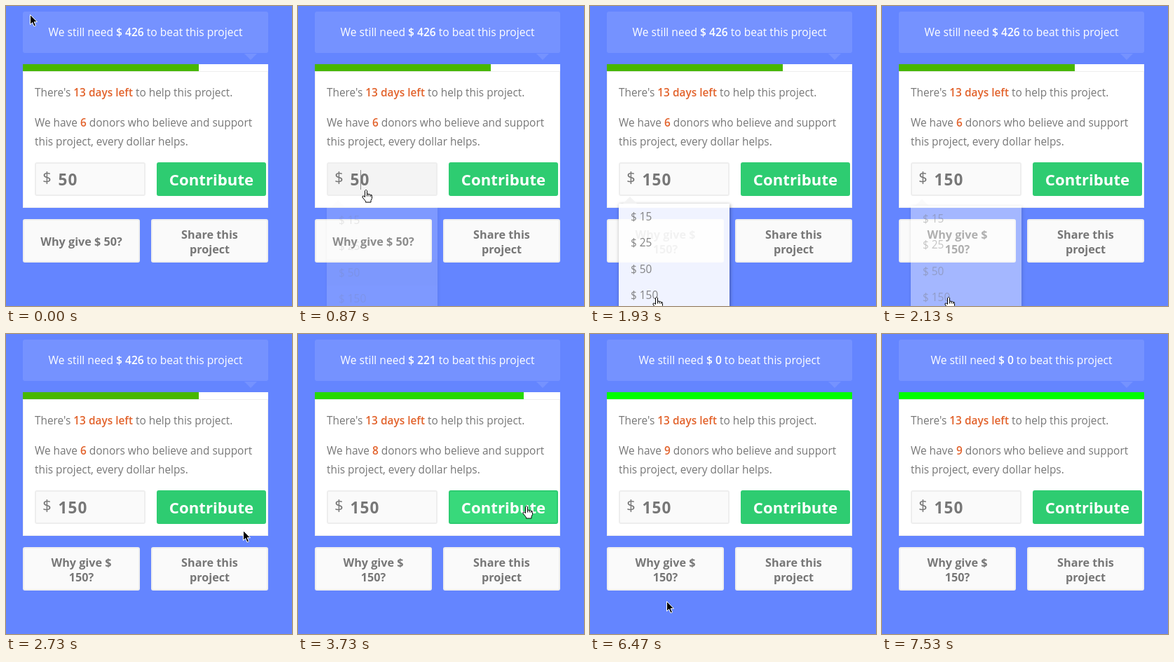
An HTML page with a canvas that plays this animation: 408 by 428 pixels, repeating every 7.99 s.

```html
<!DOCTYPE html>
<html lang="en">
<head>
<meta charset="utf-8">
<title>Contribution widget</title>
<style>
  html, body { margin: 0; overflow: hidden; background: #6485ff; }
  canvas { display: block; }
</style>
</head>
<body>
<canvas id="stage" width="408" height="428"></canvas>
<script>
const ctx = document.getElementById('stage').getContext('2d');
const LOOP = 7990, TICK = 1000 / 15;
const GREY = '#777', ORANGE = '#e2622b', GREEN = '#2ecc71';
const GOAL = 1500, MISSING = 426;

const INPUT = [41, 223, 158, 48];
const CONTRIBUTE = [215, 223, 156, 48];
const WHY = [24, 304, 167, 62];
const SHARE = [207, 304, 167, 62];
const MENU = [41, 282, 158, 170];

// Pointer path: time, x, y
const POINTER = [
  [0, 34, 12], [220, 3, 150], [350, 12, 318], [500, 210, 290], [670, 97, 262],
  [1200, 97, 262], [1600, 81, 298], [1730, 95, 415],
  [2200, 95, 415], [2670, 340, 300], [2800, 335, 256], [3070, 330, 247], [3270, 326, 245],
  [3950, 326, 245], [4200, 192, 245],
  [5270, 192, 245], [5600, 60, 440],
  [6440, 105, 440], [6470, 109, 381], [6600, 150, 230],
  [6800, 150, 230], [7330, 26, 413], [7470, 26, 413], [7530, 26, 440]
];

const ARROW = new Path2D('M0 0V14L3.2 11L5.5 16.5L8 15.4L5.7 10.2H10Z');
const HAND = new Path2D('M-2 10V1L-1 0H0L1 1V6L3 5.5L3.7 6.5L5 6L6.2 7.2L7.5 7L8 9V12L6.5 15V17.5H-1V16L-5.5 10.5V9L-4 8.5Z');
const KNUCKLES = new Path2D('M1 6V9M3.6 6.5V9M6.2 7.2V9.5');

const clamp = v => Math.min(1, Math.max(0, v));
const progress = (t, start, length) => clamp((t - start) / length);
const inside = (p, [x, y, w, h]) => p.x >= x && p.x < x + w && p.y >= y && p.y < y + h;

function pointerAt(t) {
  const next = POINTER.findIndex(k => k[0] > t);
  if (next < 0) return { x: 26, y: 440 };
  const [t0, x0, y0] = POINTER[next - 1], [t1, x1, y1] = POINTER[next];
  const u = (t - t0) / (t1 - t0);
  return { x: x0 + (x1 - x0) * u, y: y0 + (y1 - y0) * u };
}

function box([x, y, w, h], fill, border) {
  ctx.beginPath();
  ctx.roundRect(x, y, w, h, 3);
  ctx.fillStyle = border || fill;
  ctx.fill();
  if (!border) return;
  ctx.beginPath();
  ctx.roundRect(x + 2, y + 2, w - 4, h - 4, 1);
  ctx.fillStyle = fill;
  ctx.fill();
}

function triangle(x, y, halfWidth, height, fill) {
  ctx.beginPath();
  ctx.moveTo(x - halfWidth, y);
  ctx.lineTo(x + halfWidth, y);
  ctx.lineTo(x, y + height);
  ctx.fillStyle = fill;
  ctx.fill();
}

function text(str, x, y, { size = 15.4, weight = 500, color = GREY, align = 'left', spacing = 0 } = {}) {
  ctx.font = `${weight} ${size}px "Open Sans", "Noto Sans", sans-serif`;
  ctx.letterSpacing = spacing + 'px';
  ctx.textAlign = align;
  ctx.fillStyle = color;
  ctx.fillText(str, x, y);
  return ctx.measureText(str).width;
}

// Plain text around one emphasised part; returns the right end
function sentence(x, y, [before, strong, after], strongColor, style) {
  x += text(before, x, y, style);
  x += text(strong, x, y, { ...style, color: strongColor, weight: 600 });
  return x + text(after, x, y, style);
}

function button(rect, lines) {
  box(rect, '#fafafa', '#eee');
  const x = rect[0] + rect[2] / 2;
  const y = rect[1] + 38 - (lines.length - 1) * 10.5;
  lines.forEach((line, i) => text(line, x, y + i * 21, { size: 16.2, weight: 700, align: 'center' }));
}

function header(missing) {
  box([24, 8, 350, 59], 'rgba(255,255,255,.11)');
  triangle(349, 68, 9, 9, 'rgba(255,255,255,.11)');
  const parts = ['We still need ', `$ ${missing}`, ' to beat this project'];
  const style = { size: 15.6, color: '#fff' };
  const width = sentence(0, -50, parts, '#fff', style);
  sentence(199 - width / 2, 43, parts, '#fff', style);
}

function card(t, missing, donors, amount, pointer) {
  const done = 1 - missing / GOAL;
  ctx.fillStyle = '#fff';
  ctx.fillRect(24, 83, 350, 205);
  ctx.strokeStyle = '#eee';
  ctx.lineWidth = 1;
  ctx.strokeRect(24.5, 93.5, 349, 194);
  ctx.fillStyle = `rgb(${255 * (1 - done)},${255 * done},0)`;
  ctx.fillRect(24, 83, Math.round(350 * done), 10);

  sentence(41, 129, ["There's ", '13 days left', ' to help this project.'], ORANGE);
  sentence(41, 172, ['We have ', donors, ' donors who believe and support'], ORANGE);
  text('this project, every dollar helps.', 41, 199);

  box(INPUT, inside(pointer, INPUT) ? '#f4f4f4' : '#fafafa', '#eee');
  text('$', 52, 252, { size: 22.5, weight: 400 });
  text(amount, 74.5, 256, { size: 22.5, weight: 700, spacing: 1.2 });
  if (t >= 870 && t < 1400) {
    ctx.fillStyle = '#888';
    ctx.fillRect(89, 234, 1, 28);
  }

  if (inside(pointer, CONTRIBUTE)) box(CONTRIBUTE, '#38d97b', GREEN);
  else box(CONTRIBUTE, GREEN);
  text('Contribute', 293, 256, { size: 22.2, weight: 700, color: '#fff', align: 'center' });
}

// Shadow around a rectangle, kept out of its see-through inside
function outerShadow(rect) {
  ctx.save();
  ctx.beginPath();
  ctx.rect(0, 0, 408, 428);
  ctx.rect(...rect);
  ctx.clip('evenodd');
  ctx.shadowColor = 'rgba(0,0,0,.4)';
  ctx.shadowBlur = 5;
  ctx.shadowOffsetX = ctx.shadowOffsetY = 1;
  ctx.fillStyle = '#fff';
  ctx.fillRect(...rect);
  ctx.restore();
}

function dropdown(t) {
  const closing = t >= 1930;
  const shown = closing ? 1 - progress(t, 1930, 370) : progress(t, 810, 330);
  if (!shown) return;
  ctx.save();
  ctx.globalAlpha = 0.9 * shown;
  ctx.translate(0, 6 * (1 - shown));
  outerShadow(MENU);
  triangle(57, 282, 10, -10, '#f2f2f2');
  ctx.fillStyle = '#fff';
  ctx.fillRect(...MENU);
  if (!closing) {
    ctx.fillStyle = 'rgba(0,0,0,.06)';
    ctx.fillRect(41, 356, 158, 38);
  }
  [15, 25, 50, 150].forEach((value, i) => text(`$ ${value}`, 58, 306 + Math.round(37.4 * i)));
  ctx.restore();
}

function drawPointer(p, isHand) {
  ctx.save();
  ctx.translate(Math.round(p.x) + 0.5, Math.round(p.y) + 0.5);
  ctx.lineWidth = 1;
  ctx.fillStyle = isHand ? '#fff' : '#000';
  ctx.strokeStyle = isHand ? '#000' : '#fff';
  const shape = isHand ? HAND : ARROW;
  ctx.fill(shape);
  ctx.stroke(shape);
  if (isHand) ctx.stroke(KNUCKLES);
  ctx.restore();
}

function draw(t) {
  const pointer = pointerAt(t);
  const missing = Math.ceil(MISSING * (1 - progress(t, 3470, 1200)) ** 2.7);
  const donors = 6 + [3470, 3670, 3870].filter(click => t >= click).length;
  const picked = t >= 1930;

  ctx.fillStyle = '#6485ff';
  ctx.fillRect(0, 0, 408, 428);
  header(missing);
  card(t, missing, String(donors), picked ? '150' : '50', pointer);
  button(WHY, picked ? ['Why give $', '150?'] : ['Why give $ 50?']);
  button(SHARE, ['Share this', 'project']);
  dropdown(t);

  const overMenu = t >= 870 && t < 2300 && inside(pointer, MENU);
  drawPointer(pointer, overMenu || [INPUT, CONTRIBUTE, WHY, SHARE].some(r => inside(pointer, r)));
}

// The picture advances in fixed ticks, rounded to 10 ms
function frame() {
  const tick = Math.floor((performance.now() % LOOP + 5) / TICK);
  draw(Math.round(tick * TICK / 10) * 10);
  requestAnimationFrame(frame);
}
frame();
</script>
</body>
</html>
```
